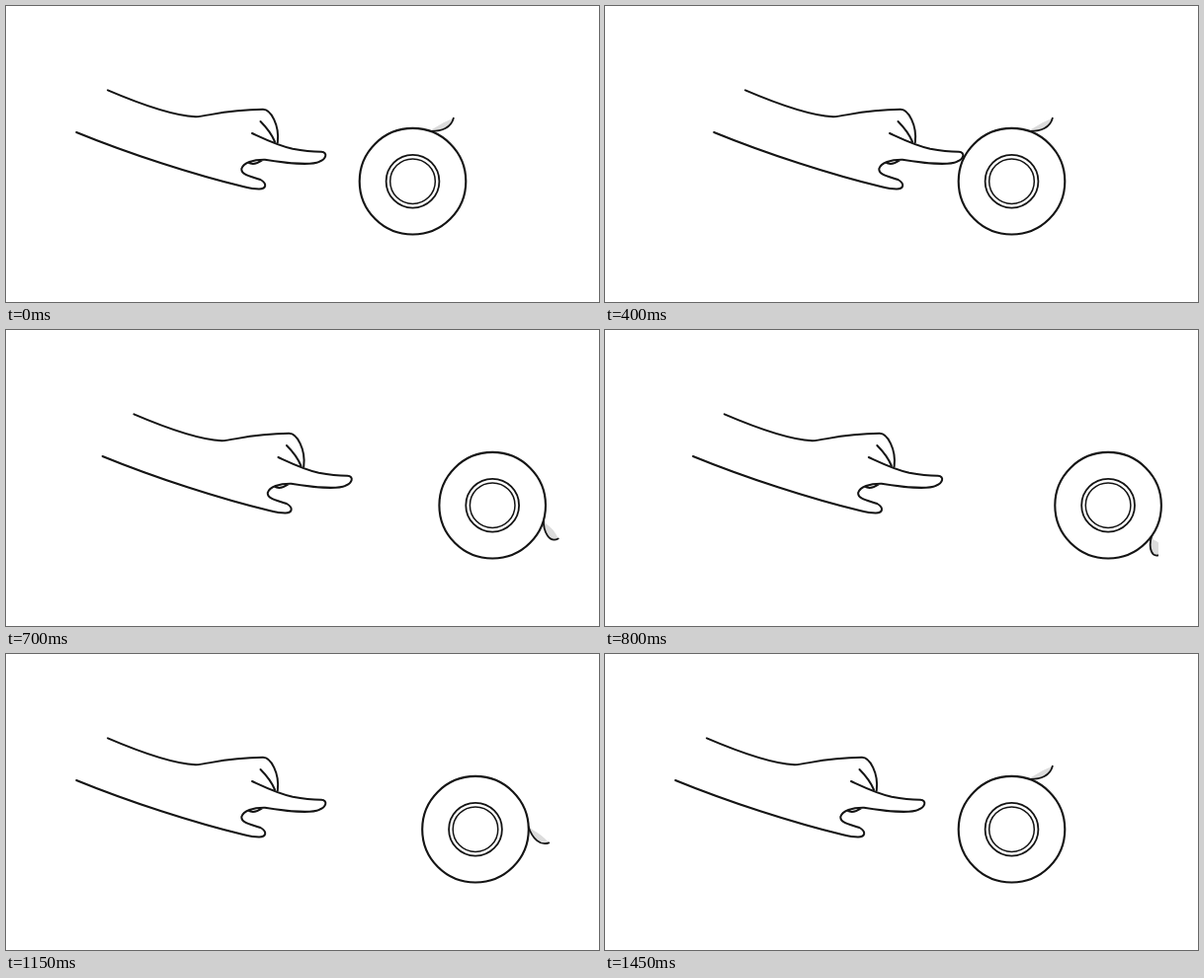
An HTML page with a canvas for the animation above (1.65 s loop, 600 by 300 pixels).

```html
<!DOCTYPE html>
<html lang="en">
<head>
<meta charset="utf-8">
<title>Hand and tape roll</title>
<style>
  html, body { margin: 0; width: 100%; height: 100%; overflow: hidden; background: #fff; }
  canvas { display: block; }
</style>
</head>
<body>
<canvas id="stage" width="600" height="300"></canvas>
<script>
const ctx = document.getElementById('stage').getContext('2d');
const LOOP = 1650, STEP = 50;
const INK = '#141414';
const ROLL = { x: 411.5, y: 177.7, radius: 53.8, travel: 100, degreesPerPixel: 1.085 };

const hand = new Path2D(
  'M103 85.3 C135 99 170 111 192 112.3 C205 111.5 222 105 260 104.8 C268 104.8 277 121 274.8 138.5' +
  'M257.5 117 C263 122.5 268 128 272 137.5' +
  'M249 129 C262 135 274 141 290 144.8 C303 147.3 313 147.8 319 147.8 C326 148.3 324 155.3 317 157.8' +
  'C310 161 288 160 262 155.7 C250 155.5 240 159 238.3 165 C238 172 250 173 257.5 176' +
  'C264.5 180 263.5 185.5 256 185.5 C251 185.5 246 184.5 241 183.3 C190 171 125 150 71.2 128' +
  'M245 158.7 C249 161 254 160 259 156.5');

// Cubic easing with flat ends; x1 and x2 are the handle positions in time.
function ease(u, x1, x2) {
  if (u <= 0) return 0;
  if (u >= 1) return 1;
  let low = 0, high = 1, s;
  for (let i = 0; i < 24; i++) {
    s = (low + high) / 2;
    const x = 3 * (1 - s) * (1 - s) * s * x1 + 3 * (1 - s) * s * s * x2 + s * s * s;
    if (x < u) low = s; else high = s;
  }
  return s * s * (3 - 2 * s);
}

const between = (t, start, end, x1, x2) => ease((t - start) / (end - start), x1, x2);

const handShift = t =>
  39 * (between(t, 150, 400, 0.42, 0.58) - between(t, 400, 1162, 0.42, 0.58));

const rollShift = t =>
  ROLL.travel * (between(t, 400, 850, 0.2, 0.6) - between(t, 850, 1450, 0.37, 0.92));

function ring(radius, width) {
  ctx.beginPath();
  ctx.arc(0, 0, radius, 0, 2 * Math.PI);
  ctx.lineWidth = width;
  ctx.stroke();
}

function drawHand(shift) {
  ctx.save();
  ctx.translate(shift, 0);
  ctx.lineWidth = 2;
  ctx.stroke(hand);
  ctx.restore();
}

// The loose end curls up as the roll nears the far side.
function drawTail(curl) {
  const tipX = 41.3 - 11 * curl, tipY = -64 - 2.5 * curl;
  const edge = new Path2D();
  edge.moveTo(16, -51);
  edge.bezierCurveTo(30, -50, 39 + 4 * curl, -55 - 3 * curl, tipX, tipY);
  const fill = new Path2D(edge);
  fill.quadraticCurveTo(tipX - 10, tipY + 3.5, 21, -53.5);
  ctx.fillStyle = '#dcdcdc';
  ctx.fill(fill);
  ctx.lineWidth = 1.8;
  ctx.stroke(edge);
}

function drawRoll(shift) {
  ctx.save();
  ctx.beginPath();
  ctx.rect(0, 0, 560, 300);
  ctx.clip();
  ctx.translate(ROLL.x + shift, ROLL.y);
  ctx.rotate(shift * ROLL.degreesPerPixel * Math.PI / 180);
  drawTail((shift / ROLL.travel) ** 4);
  ctx.restore();

  ctx.save();
  ctx.translate(ROLL.x + shift, ROLL.y);
  ctx.beginPath();
  ctx.arc(0, 0, ROLL.radius, 0, 2 * Math.PI);
  ctx.fillStyle = '#fff';
  ctx.fill();
  ring(ROLL.radius, 2.1);
  ring(26.9, 1.8);
  ring(22.8, 1.5);
  ctx.restore();
}

function draw(now) {
  const t = Math.floor((now % LOOP) / STEP) * STEP;
  ctx.fillStyle = '#fff';
  ctx.fillRect(0, 0, 600, 300);
  ctx.strokeStyle = INK;
  ctx.lineCap = ctx.lineJoin = 'round';
  drawHand(handShift(t));
  drawRoll(rollShift(t));
}

let start;
function tick(now) {
  start ??= now;
  draw(Math.max(0, now - start));
  requestAnimationFrame(tick);
}
draw(0);
requestAnimationFrame(tick);
</script>
</body>
</html>
```
